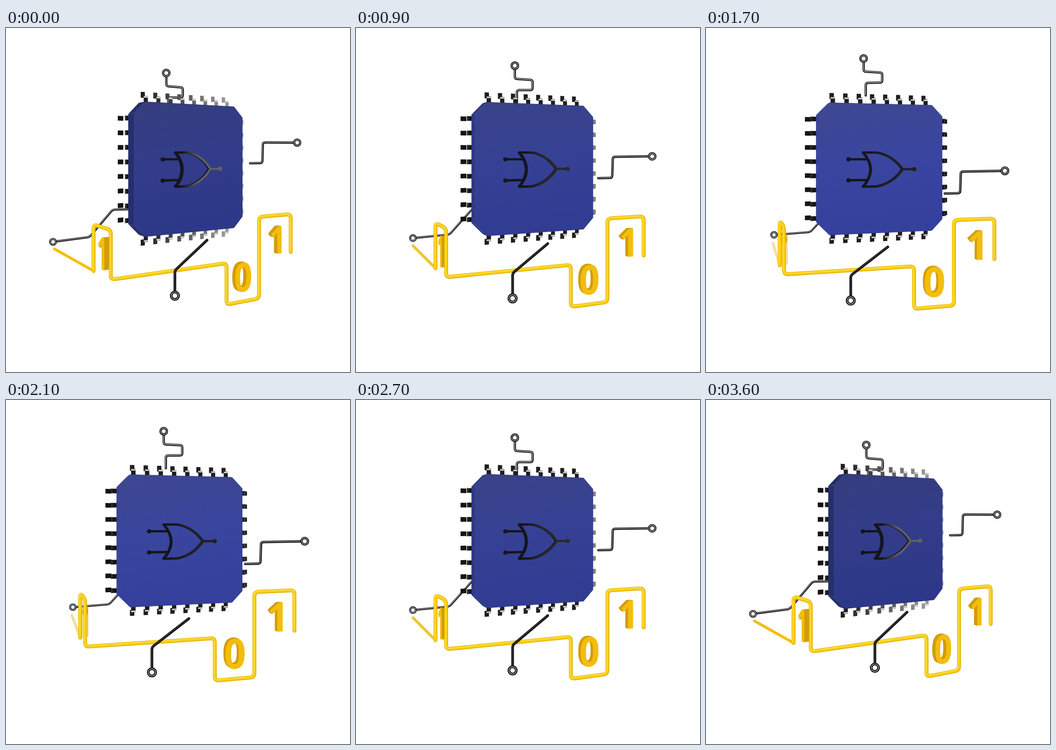
An HTML page for the animation above (3.7 s loop, 748 by 748 pixels).

```html
<!DOCTYPE html>
<html lang="en">
<head>
<meta charset="utf-8">
<title>Logic chip</title>
<style>
  html, body { margin: 0; width: 100%; height: 100%; overflow: hidden; background: #fff; }
  svg { display: block; width: 100%; height: 100%; }
  text { font: 700 100px "Open Sans", "Noto Sans", sans-serif; text-anchor: middle; }
</style>
</head>
<body>
<svg id="stage" viewBox="0 0 748 748"></svg>
<script>
// One unit is the side of the chip. A point is [u, v, a]: right, down, and
// outward along the chip's normal, measured from the turning axis.
const STEP = 100, STEPS = 37, HALF = 18;
const FOCAL = 1090, DISTANCE = 4.185, EYE = [374, 266], OFFSET = [-.046, .14];
const TURN = [30.8, 14.8];
const FRONT = .3, BACK = .2, GATE_FACE = .32, SIGNAL = .49, LEFT = -.775;
const stage = document.getElementById('stage');

let sin, cos, e; // turn of the chip and progress of the swing

const mix = (a, b, t) => a + (b - a) * t;
const grey = v => `rgb(${[v, v, v].map(Math.round)})`;
const hsl = (h, s, l) => `hsl(${h},${s}%,${l}%)`;
const at = p => p.map(n => n.toFixed(2)).join(' ');
const add = (p, q, k = 1) => p.map((n, i) => n + q[i] * k);

function ease(p) { // cubic-bezier(.42, 0, .58, 1)
  let lo = 0, hi = 1;
  for (let i = 0; i < 30; i++) {
    const s = (lo + hi) / 2, q = 1 - s;
    if (3 * q * q * s * .42 + 3 * q * s * s * .58 + s ** 3 < p) lo = s; else hi = s;
  }
  return lo * lo * (3 - 2 * lo);
}

const scaleAt = ([u, , a]) => FOCAL / (DISTANCE + u * sin - a * cos);
function project(p) {
  const [u, v, a] = p, scale = scaleAt(p);
  return [EYE[0] + scale * (OFFSET[0] + u * cos + a * sin), EYE[1] + scale * (OFFSET[1] + v)];
}

const polygon = (points, fill, extra = '') =>
  `<path d="M${points.map(project).map(at).join('L')}Z" fill="${fill}" ${extra}/>`;
const line = (d, color, width, shift = 0) =>
  `<path d="${d}" fill="none" stroke="${color}" stroke-width="${width}" stroke-linecap="round" stroke-linejoin="round" transform="translate(${shift} ${shift})"/>`;

function rounded(points, radius) {
  let d = 'M' + at(points[0]);
  for (let i = 1; i < points.length - 1; i++) {
    const p = points[i];
    const toward = q => {
      const t = Math.min(radius / (Math.hypot(q[0] - p[0], q[1] - p[1]) || 1), .5);
      return [mix(p[0], q[0], t), mix(p[1], q[1], t)];
    };
    d += `L${at(toward(points[i - 1]))}Q${at(p)} ${at(toward(points[i + 1]))}`;
  }
  return d + 'L' + at(points[points.length - 1]);
}

// A wire lies in one plane, starts at its ring and slides along v.
function wire(plane, slide, shine, route) {
  const points = route.map(([u, v]) => [u, v + slide * e, plane]);
  const scale = scaleAt(points[0]), radius = .026 * scale, width = .019 * scale;
  const [ring, next, ...rest] = points.map(project);
  const length = Math.hypot(next[0] - ring[0], next[1] - ring[1]);
  const start = [0, 1].map(i => mix(ring[i], next[i], radius / length));
  const d = rounded([start, next, ...rest], 5);
  const circle = (color, stroke) =>
    `<circle cx="${ring[0]}" cy="${ring[1]}" r="${radius}" fill="none" stroke="${color}" stroke-width="${stroke}"/>`;
  return line(d, '#141418', width) + line(d, grey(shine), 1.5, -.4) +
    circle('#141418', width) + circle('#b8b8bc', 1.3);
}

const SIDES = { // maps (distance from centre, place along the edge) to u, v
  top: (out, t) => [t, -out],
  bottom: (out, t) => [t, out],
  left: (out, t) => [-out, t],
  right: (out, t) => [out, t]
};

function pins(side) {
  const upright = side === 'top' || side === 'bottom';
  const bar = (t, from, to, a, color) => polygon(
    [[from, -1], [to, -1], [to, 1], [from, 1]].map(([out, k]) => [...SIDES[side](out, t + k * .0175), a]), color);
  let out = '';
  for (let i = 0; i < 8; i++) {
    const t = mix(-.378, .378, i / 7);
    const lit = upright ? mix(30, mix(150, 30, Math.min(1, 2 * e)), i / 7)
      : side === 'right' ? mix(140, 20, e * e) : 20;
    out += bar(t, .54, .585, BACK, grey(lit)) + bar(t, .49, .55, .25, grey(lit)) +
      bar(t, .537, .548, .25, upright ? '#d6d6d8' : grey(lit + 30));
  }
  return out;
}

function chip() {
  const h = .5, c = h - .088;
  const ring = a => [[-c, -h], [c, -h], [h, -c], [h, c], [c, h], [-c, h], [-h, c], [-h, -c]].map(p => [...p, a]);
  const front = ring(FRONT), back = ring(BACK);
  const light = mix(36, 41.5, e), edge = hsl(233, 48, mix(29, 42, e));
  const sides = front.map((p, i) => {
    const j = (i + 1) % 8;
    return polygon([p, front[j], back[j], back[i]], edge);
  }).join('');
  const stops = [[0, 40, -1], [.5, 47, 1], [1, 50, -.5]].map(([offset, s, l]) =>
    `<stop offset="${offset}" stop-color="${hsl(233, s, light + l)}"/>`).join('');
  return `<linearGradient id="face" x1="0" y1="0" x2=".15" y2="1">${stops}</linearGradient>` + sides +
    polygon(front, 'url(#face)', `stroke="${hsl(233, 48, light - 3)}" stroke-width=".8"`);
}

function gate() {
  const mid = .008, half = .131, input = .08, back = -.154, shoulder = -.045, tip = .163;
  const outline = a => {
    const p = (u, v) => at(project([u, mid + v, a]));
    const bend = mix(shoulder, tip, .62), drop = half * .83;
    return `M${p(back, -half)}L${p(shoulder, -half)}Q${p(bend, -drop)} ${p(tip, 0)}` +
      `Q${p(bend, drop)} ${p(shoulder, half)}L${p(back, half)}Q${p(-.034, 0)} ${p(back, -half)}Z` +
      [-input, input].map(v => `M${p(-.27, v)}L${p(-.117, v)}`).join('') + `M${p(tip, 0)}L${p(.258, 0)}`;
  };
  const dots = [[-.27, -input], [-.27, input], [.258, 0]].map(([u, v]) => {
    const [x, y] = project([u, mid + v, GATE_FACE]);
    return `<circle cx="${x}" cy="${y}" r="4.7" fill="url(#metal)"/>`;
  }).join('');
  const [x] = project([-.1, 0, GATE_FACE]);
  return `<linearGradient id="metal" gradientUnits="userSpaceOnUse" x1="${x}" x2="${x + 35}" y1="0" y2="0">
    <stop stop-color="#14151b"/><stop offset="1" stop-color="${grey(mix(96, 32, Math.min(1, 1.7 * e)))}"/></linearGradient>` +
    line(outline(FRONT), '#141628', 4.6) + line(outline(GATE_FACE), 'url(#metal)', 4.6) + dots;
}

function signal() {
  const high = .395, low = .73, near = -.765, zero = [.197, .52], end = .862;
  const tail = [[LEFT, low, -.74], [LEFT, low, .2]];
  const front = [[near, high], [near, low], [zero[0], low], [zero[0], 1.05], [zero[1], 1.05],
    [zero[1], high], [end, high], [end, .713]].map(p => [...p, SIGNAL]);
  const tube = rounded([tail[1], [LEFT, high, .2], ...front].map(project), 9);
  return line('M' + tail.map(project).map(at).join('L'), hsl(46, mix(92, 80, e), mix(50, 80, e * e)), 6) +
    line(tube, '#dfac04', 8.4) + line(tube, '#fad00c', 6, -.4) + line(tube, '#ffe155', 1.3, -1.3);
}

// Letters stand on the plane of "across" and are extruded along "inward".
function digit(char, centre, across, inward) {
  const unit = .315 / 100, tiny = .01;
  const copy = (depth, fill) => {
    const p = add(centre, inward, depth), origin = project(p);
    const axis = v => project(add(p, v, tiny)).map((n, i) => (n - origin[i]) / tiny * unit);
    const matrix = [...axis(across), ...axis([0, 1, 0]), ...origin].map(n => n.toFixed(4));
    return `<text y="35.7" fill="${fill}" transform="matrix(${matrix})">${char}</text>`;
  };
  return [.04, .03, .02, .01].map(depth => copy(depth, '#d19d08')).join('') + copy(0, '#f3bd0c');
}

function draw(step) {
  e = ease(1 - Math.abs(step - HALF) / HALF);
  const angle = (TURN[0] - (TURN[0] - TURN[1]) * e) * Math.PI / 180;
  sin = Math.sin(angle);
  cos = Math.cos(angle);
  const right = [1, 0, 0], outward = [0, 0, 1], inward = [0, 0, -1];
  stage.innerHTML =
    wire(-.83, -.015, 150, [[-.76, .683], [-.415, .671], [-.18, .428], [-.02, .435]]) +
    wire(.05, -.122, 190, [[-.088, -.772], [-.088, -.665], [.07, -.663], [.07, -.58], [-.07, -.573], [-.07, -.47]]) +
    Object.keys(SIDES).map(pins).join('') + chip() + gate() +
    wire(.448, .231, 150, [[.977, -.206], [.596, -.204], [.59, -.036], [.462, -.036]]) +
    digit('1', [LEFT, .575, .36], outward, right) + signal() +
    digit('0', [.36, .86, SIGNAL], right, inward) + digit('1', [.72, .6, SIGNAL], right, inward) +
    wire(.55, .04, 60, [[-.3, .892], [-.3, .713], [-.025, .523]]);
}

const begin = performance.now();
let shown = -1;
function tick() {
  const step = Math.floor((performance.now() - begin) / STEP) % STEPS;
  if (step !== shown) draw(shown = step);
  requestAnimationFrame(tick);
}
tick();
</script>
</body>
</html>
```
